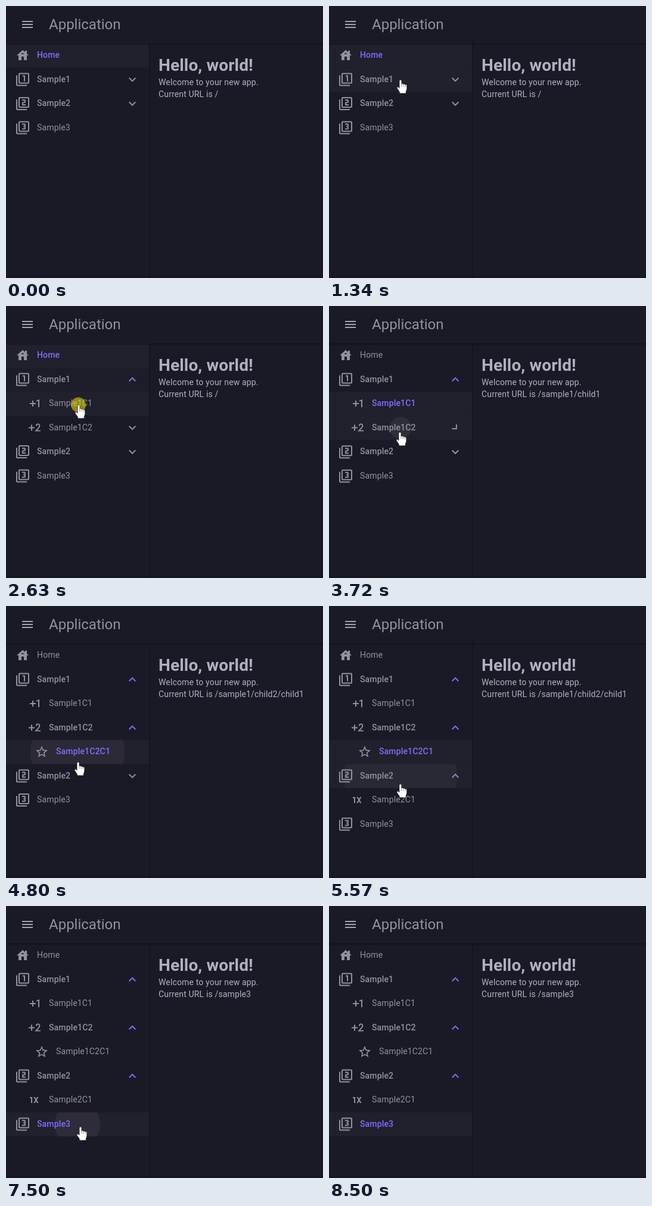
An HTML page that plays this animation: 532 px wide and 457 px high, repeating every 9.23 s.

```html
<!DOCTYPE html>
<html lang="en">
<head>
<meta charset="utf-8">
<title>Application</title>
<style>
  html, body { margin: 0; width: 100%; height: 100%; overflow: hidden; background: #1a1a27; }
  #stage { display: block; width: 532px; height: 457px; }
  text { font: 400 14px Roboto, sans-serif; letter-spacing: .15px; fill: #b2b0bf; white-space: pre; }
  #title { font-size: 24px; letter-spacing: 0; fill: #92929f; }
  #hello { font-size: 28px; font-weight: 700; }
</style>
</head>
<body>
<svg id="stage" viewBox="0 0 532 457">
  <defs>
    <linearGradient id="shade" x2="0" y2="1">
      <stop stop-opacity=".4"/><stop offset="1" stop-opacity="0"/>
    </linearGradient>
  </defs>
  <rect width="532" height="457" fill="#1a1a27"/>
  <g id="nav"></g>
  <rect x="240" y="63" width="1.6" height="394" opacity=".25"/>
  <rect width="532" height="63" fill="#1a1a27"/>
  <rect y="63" width="532" height="3" fill="url(#shade)"/>
  <rect y="454" width="532" height="3" opacity=".15"/>
  <path transform="translate(24 19)" fill="#a4a4ab" d="M3 18h18v-2H3zM3 13h18v-2H3zM3 6v2h18V6z"/>
  <text id="title" x="72" y="39">Application</text>
  <text id="hello" x="256" y="109">Hello, world!</text>
  <text x="256" y="133">Welcome to your new app.</text>
  <text id="url" x="256" y="153"></text>
  <circle id="press" r="12.5" fill="#fff000" opacity=".5"/>
  <g id="pointer">
    <g id="hand">
      <path fill="#fff" stroke="#000" stroke-width=".5" d="M-1.9 2a1.9 1.9 0 0 1 3.8 0v5a1.8 1.8 0 0 1 3.2.7 1.8 1.8 0 0 1 3 .8 1.6 1.6 0 0 1 2.6 1.4V15c0 2-1.5 3.5-1.5 5v2.7H-1.5v-2.2l-4.1-6c-1-1.6 1-3.2 2.4-1.9L-1.9 14z"/>
      <path fill="none" stroke="#1a1a27" stroke-width=".5" d="M1.9 7v4.5M5.1 7.8v3.8M8.1 8.6v3.2"/>
    </g>
    <path id="arrow" fill="#fff" stroke="#000" stroke-width=".8" d="M0 0v17l4-4 2.6 6 2.4-1-2.6-6H12z"/>
  </g>
</svg>
<script>
const LOOP = 9230, ROW = 40.5, TOP = 63;
const GREY = [146, 146, 159], PRIMARY = [126, 111, 255];
const $ = id => document.getElementById(id);
const clamp = v => Math.max(0, Math.min(1, v));
const smooth = v => { v = clamp(v); return v * v * (3 - 2 * v); };
const show = (el, on) => el.setAttribute('visibility', on ? 'visible' : 'hidden');

function add(parent, tag, attrs = {}) {
  const el = document.createElementNS('http://www.w3.org/2000/svg', tag);
  set(el, attrs);
  return parent.appendChild(el);
}
function set(el, attrs) {
  for (const key in attrs) el.setAttribute(key, attrs[key]);
}
function mix(a, b, k) {
  return `rgb(${a.map((v, i) => Math.round(v + (b[i] - v) * k))})`;
}

const FRAME = 'M3 5H1v16c0 1.1.9 2 2 2h16v-2H3zM21 1H7c-1.1 0-2 .9-2 2v14c0 1.1.9 2 2 2h14c1.1 0 2-.9 2-2V3c0-1.1-.9-2-2-2zm0 16H7V3h14z';
const ICONS = {
  house: 'M19 9.3V4h-3v2.6L12 3 2 12h3v8h5v-6h4v6h5v-8h3zM10 10c0-1.1.9-2 2-2s2 .9 2 2z',
  one: FRAME + 'M14 15h2V5h-4v2h2z',
  two: FRAME + 'M17 13h-4v-2h2c1.1 0 2-.89 2-2V7c0-1.11-.9-2-2-2h-4v2h4v2h-2c-1.1 0-2 .89-2 2v4h6z',
  three: FRAME + 'M17 13v-1.5c0-.83-.67-1.5-1.5-1.5.83 0 1.5-.67 1.5-1.5V7c0-1.11-.9-2-2-2h-4v2h4v2h-2v2h2v2h-4v2h4c1.1 0 2-.89 2-2z',
  plus1: 'M10 7H8v4H4v2h4v4h2v-4h4v-2h-4zM20 18h-2V7.38L15 8.4V6.7L19.7 5h.3z',
  plus2: 'M8 7H6v4H2v2h4v4h2v-4h4v-2H8z',
  star: 'M22 9.24l-7.19-.62L12 2 9.19 8.63 2 9.24l5.46 4.73L5.82 21 12 17.27 18.18 21l-1.63-7.03zM12 15.4l-3.76 2.27 1-4.28-3.32-2.88 4.38-.38L12 6.1l1.71 4.04 4.38.38-3.32 2.88 1 4.28z',
  times: 'M4 7h4v10H6V9H4zM15.5 12l3-5h-2.3l-1.8 3.1L12.6 7h-2.3l3 5-3 5h2.3l1.8-3.1 1.8 3.1h2.3z'
};

// x is the icon's left edge; open is when a group starts to expand
const rows = [
  { name: 'Home', icon: 'house', x: 16 },
  { name: 'Sample1', icon: 'one', x: 16, open: 1880, boldFrom: 0 },
  { name: 'Sample1C1', icon: 'plus1', x: 36, parent: 1 },
  { name: 'Sample1C2', icon: 'plus2', x: 36, parent: 1, open: 3650, boldFrom: 2700 },
  { name: 'Sample1C2C1', icon: 'star', x: 48, parent: 3 },
  { name: 'Sample2', icon: 'two', x: 16, open: 5160, boldFrom: 0 },
  { name: 'Sample2C1', icon: 'times', x: 36, parent: 5 },
  { name: 'Sample3', icon: 'three', x: 16 }
];
const clicks = [
  { row: 1, down: 1800, up: 1880 },
  { row: 2, down: 2630, up: 2700, url: 'sample1/child1' },
  { row: 3, down: 3520, up: 3650 },
  { row: 4, down: 4380, up: 4470, url: 'sample1/child2/child1' },
  { row: 5, down: 5080, up: 5160 },
  { row: 6, down: 5920, up: 6000, url: 'sample2/child1' },
  { row: 7, down: 7280, up: 7350, url: 'sample3' }
];
// pointer path: time, x, y
const path = [
  [380, 389, 448], [600, 280, 380], [800, 130, 280], [950, 66, 215], [1100, 84, 160],
  [1270, 119, 125], [1340, 120, 124], [2240, 120, 124], [2490, 122, 166], [2950, 122, 166],
  [3480, 119, 212], [4080, 119, 212], [4360, 121, 250], [4620, 121, 250], [4800, 121, 262],
  [5040, 120, 295], [5540, 120, 295], [5780, 119, 327], [6530, 119, 327], [6670, 119, 341],
  [7010, 125, 371], [7770, 125, 371], [8100, 129, 396], [8500, 135, 457]
];

for (const r of rows) {
  r.box = add($('nav'), 'svg', { width: 240 });
  r.back = add(r.box, 'rect', { width: 240, height: ROW, fill: '#21202d' });
  r.ripple = add(r.box, 'circle', { cx: 120, cy: ROW / 2, fill: '#adadb1' });
  const icon = add(r.box, 'g', { transform: `translate(${r.x} 8)` });
  add(icon, 'path', { d: ICONS[r.icon], fill: mix(GREY, GREY, 0) });
  if (r.icon === 'plus2')
    add(icon, 'path', { d: 'M14.9 9C14.9 4.7 20.5 4.9 20.4 8.8c0 1.6-1 2.7-2 3.8l-4.2 4.5H22', fill: 'none', stroke: mix(GREY, GREY, 0), 'stroke-width': 1.9 });
  r.label = add(r.box, 'text', { x: r.x + 36 });
  r.label.textContent = r.name;
  if (r.open)
    r.arrow = add(r.box, 'path', { d: 'M7.41 8.59 12 13.17l4.59-4.58L18 10l-6 6-6-6z' });
}

function pointerAt(t) {
  const i = path.findIndex(p => p[0] > t);
  if (i < 1) return null;
  const [a, b] = [path[i - 1], path[i]];
  const k = (t - a[0]) / (b[0] - a[0]);
  return { x: a[1] + (b[1] - a[1]) * k, y: a[2] + (b[2] - a[2]) * k };
}

function layout(t) {
  const shown = r => r.parent === undefined ? 1 :
    smooth((t - rows[r.parent].open - 60) / 300) * shown(rows[r.parent]);
  const total = {};
  for (const r of rows) if (r.parent !== undefined) total[r.parent] = (total[r.parent] || 0) + ROW;
  let y = TOP;
  rows.forEach((r, i) => {
    r.y = y;
    r.h = ROW;
    if (r.parent !== undefined) {
      // a collapsing group hides its last children first
      const p = rows[r.parent];
      const bottom = p.y + p.h + total[r.parent] * shown(r);
      r.h = Math.max(0, Math.min(ROW, bottom - y));
    }
    y += r.h;
  });
}

function draw(t) {
  const at = pointerAt(t);
  const last = clicks.filter(c => t >= c.down).pop();
  const visited = clicks.filter(c => c.url && t >= c.up + 70).pop();
  const linked = clicks.filter(c => c.url && t >= c.up + 130).pop();
  const active = linked ? linked.row : 0;
  layout(t);
  const hover = at && at.x < 240 ? rows.findIndex(r => at.y >= r.y && at.y < r.y + r.h) : -1;

  rows.forEach((r, i) => {
    set(r.box, { y: r.y, height: r.h });
    r.box.style.display = r.h > 0 ? '' : 'none';
    const on = i === active;
    show(r.back, on || i === hover || (last && last.row === i));
    const bold = on || t >= r.boldFrom;
    r.label.style.fontWeight = bold ? 500 : 400;
    r.label.style.fill = mix(GREY, PRIMARY, on ? 1 : 0);
    set(r.label, { y: Math.round(r.y + 24) - r.y });
    const click = clicks.find(c => c.row === i);
    const age = click ? t - click.up : -1;
    const live = age >= 0 && age < 1000;
    show(r.ripple, live);
    if (live) set(r.ripple, { r: 122 * (1 - (1 - clamp(age / 600)) ** 1.3), opacity: .1 * (1 - age / 1000) });
    if (r.arrow) set(r.arrow, {
      transform: `translate(200 8) rotate(${-180 * smooth((t - r.open) / 220)} 12 12)`,
      fill: mix(GREY, PRIMARY, clamp((t - r.open - 200) / 800))
    });
  });

  $('url').textContent = 'Current URL is /' + (visited ? visited.url : '');
  show($('press'), last && t < last.up);
  show($('hand'), at && hover >= 0);
  show($('arrow'), at && hover < 0);
  if (at) {
    set($('pointer'), { transform: `translate(${at.x} ${at.y})` });
    set($('press'), { cx: at.x - .5, cy: at.y });
  }
}

const start = performance.now();
function tick() {
  draw((performance.now() - start) % LOOP);
  requestAnimationFrame(tick);
}
tick();
</script>
</body>
</html>
```
